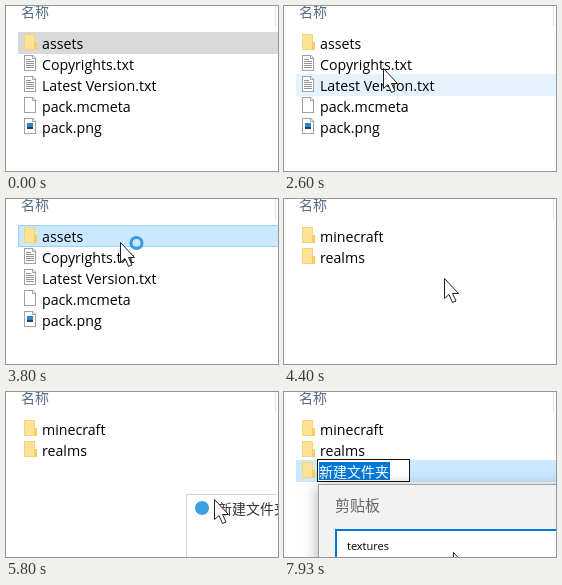
Write an HTML page with a canvas that moves like this. It is 272 px wide and 165 px high and loops after 8000 ms.

```html
<!DOCTYPE html>
<html lang="zh">
<head>
<meta charset="utf-8">
<title>File list</title>
<style>
html, body { margin: 0; width: 100%; height: 100%; overflow: hidden; background: #fff; }
canvas { display: block; }
</style>
</head>
<body>
<canvas id="stage" width="272" height="165"></canvas>
<script>
const c = document.getElementById('stage').getContext('2d');
const LATIN = '"Open Sans", "Noto Sans", sans-serif';
const CJK = '"Noto Sans CJK SC", "Noto Sans CJK", sans-serif';
const LOOP = 8000, TICK = 1000 / 15;
const TOP = 27, ROW = 21;

const pack = [
  ['folder', 'assets'], ['text', 'Copyrights.txt'], ['text', 'Latest Version.txt'],
  ['page', 'pack.mcmeta'], ['image', 'pack.png']
];
const folders = [['folder', 'minecraft'], ['folder', 'realms']];

// moments, in ticks
const T = { enter: 20, deselect: 27, open: 57, empty: 58, filled: 61, ready: 62,
  menu: 77, create: 88, rename: 90, paste: 111 };

// pointer moves: first tick, last tick, where it ends
const moves = [
  [20, 21, 235, 149], [23, 28, 165, 98], [36, 39, 99, 62], [39, 49, 114, 43],
  [63, 66, 160, 79], [66, 68, 177, 99], [76, 84, 208, 107],
  [95, 96, 195, 95], [101, 102, 208, 107], [117, 119, 169, 160]
];

const clamp = v => Math.max(0, Math.min(1, v));
const smooth = v => v * v * (3 - 2 * v);
const between = (n, a, b) => n >= a && n < b;

function pointer(n) {
  let x = 232, y = 156;
  for (const [from, to, toX, toY] of moves) {
    const k = smooth(clamp((n - from) / (to - from)));
    x += (toX - x) * k;
    y += (toY - y) * k;
  }
  return [Math.round(x), Math.round(y)];
}

function rect(x, y, w, h, fill, line) {
  c.fillStyle = fill;
  c.fillRect(x, y, w, h);
  if (line) {
    c.strokeStyle = line;
    c.lineWidth = 1;
    c.strokeRect(x + .5, y + .5, w - 1, h - 1);
  }
}

function text(s, x, y, size, color, family) {
  c.font = size + 'px ' + family;
  c.fillStyle = color;
  c.fillText(s, x, y);
}

function icon(kind, y) {
  c.save();
  c.translate(18, y + 1);
  if (kind === 'folder') {
    rect(0, 0, 11, 16, '#ffe394', '#f5d57c');
    rect(10, 8, 3, 8, '#f7cd62');
  } else {
    rect(0, 0, 12, 16, '#fff', '#a2a2a2');
    rect(9, 0, 3, 3, '#fff');
    c.beginPath();
    c.moveTo(8.5, 0);
    c.lineTo(8.5, 3.5);
    c.lineTo(12, 3.5);
    c.closePath();
    c.strokeStyle = '#a2a2a2';
    c.stroke();
    if (kind === 'text') {
      for (let i = 0; i < 5; i++) rect(2, 4 + i * 2, i ? 8 : 5, 1, '#929292');
    }
    if (kind === 'image') {
      rect(3, 5, 6, 6, '#2a86cf');
      rect(3, 9, 6, 2, '#17456f');
    }
  }
  c.restore();
}

function list(items) {
  items.forEach(([kind, name], i) => {
    const y = TOP + i * ROW;
    icon(kind, y);
    text(name, 36, y + 16, 14.2, '#000', LATIN);
  });
}

function rowBack(i, fill, line) {
  rect(12, TOP + i * ROW - 1, 262, ROW + 1, fill, line);
}

// the highlight trails the pointer by one tick
function hover(n, count) {
  const i = Math.floor((pointer(n - 1)[1] - TOP) / ROW);
  if (i >= 0 && i < count) rowBack(i, '#e5f3ff');
}

function newFolder(n) {
  const y = TOP + 2 * ROW;
  rowBack(2, '#cce8ff');
  icon('folder', y);
  if (n < T.rename) {
    text('新建文件夹', 35, y + 16, 14, '#000', CJK);
    return;
  }
  rect(33, y - 2, 93, 23, '#fff', '#111');
  rect(35, y + 1, 71, 18, '#0078d7');
  text('新建文件夹', 35, y + 16, 14, '#fff', CJK);
  const blink = Math.floor((n - T.rename - 1) / 8);
  if (blink % 2 === 0) rect(105, y, 1, 20, '#000');
}

function menu(n) {
  c.globalAlpha = clamp((n - T.menu + 1) / 3);
  rect(180, 102, 100, 70, '#fff', '#d6d6d6');
  c.beginPath();
  c.arc(196, 116, 7, 0, 7);
  c.fillStyle = '#3b9fe2';
  c.fill();
  text('新建文件夹', 212, 122, 14, '#333', CJK);
  c.globalAlpha = 1;
}

function clipboard(n) {
  const k = clamp((n - T.paste + 1) / 5);
  c.save();
  c.globalAlpha = k;
  c.translate(0, Math.round(50 * (1 - k) ** 2));
  c.shadowColor = 'rgba(0,0,0,.35)';
  c.shadowBlur = 14;
  c.shadowOffsetY = 3;
  rect(34, 92, 250, 90, '#f2f2f2');
  c.shadowColor = 'transparent';
  rect(34, 92, 250, 90, '#f2f2f2', '#a0a0a0');
  text('剪贴板', 51, 119, 15, '#666', CJK);
  rect(51, 137, 230, 50, '#0078d7');
  rect(53, 139, 230, 50, '#fff');
  text('textures', 63, 158, 11, '#000', LATIN);
  c.restore();
}

function arrow([x, y]) {
  c.save();
  c.translate(x + .5, y + .5);
  c.beginPath();
  [[0, 0], [0, 20], [4.5, 16], [8, 24], [11.5, 22.5], [8, 15], [14, 15]]
    .forEach(p => c.lineTo(...p));
  c.closePath();
  c.fillStyle = '#fff';
  c.fill();
  c.strokeStyle = '#222';
  c.lineWidth = 1;
  c.stroke();
  c.restore();
}

function ring() {
  c.beginPath();
  c.arc(130.5, 44, 5.5, 0, 7);
  c.lineWidth = 3;
  c.strokeStyle = '#3c97e0';
  c.stroke();
}

function draw(n) {
  rect(0, 0, 272, 165, '#fff');
  text('名称', 15, 11, 14, '#566a88', CJK);
  rect(269, 0, 1, 20, '#e3e3e3');

  if (n < T.empty) {
    if (n < T.deselect) rowBack(0, '#d9d9d9');
    else if (n < T.open) hover(n, pack.length);
    else rowBack(0, '#cce8ff', '#99d1ff');
    list(pack);
  } else if (n >= T.filled) {
    if (between(n, T.ready, T.menu)) hover(n, folders.length);
    list(folders);
  }
  if (between(n, T.menu, T.create)) menu(n);
  if (n >= T.create) newFolder(n);
  if (n >= T.paste) clipboard(n);
  if (n >= T.enter) arrow(pointer(n));
  if (between(n, T.open, T.ready)) ring();
}

const start = performance.now();
function loop() {
  const t = (performance.now() - start) % LOOP;
  draw(Math.min(119, Math.floor((t + 4) / TICK)));
  requestAnimationFrame(loop);
}
loop();
</script>
</body>
</html>
```
